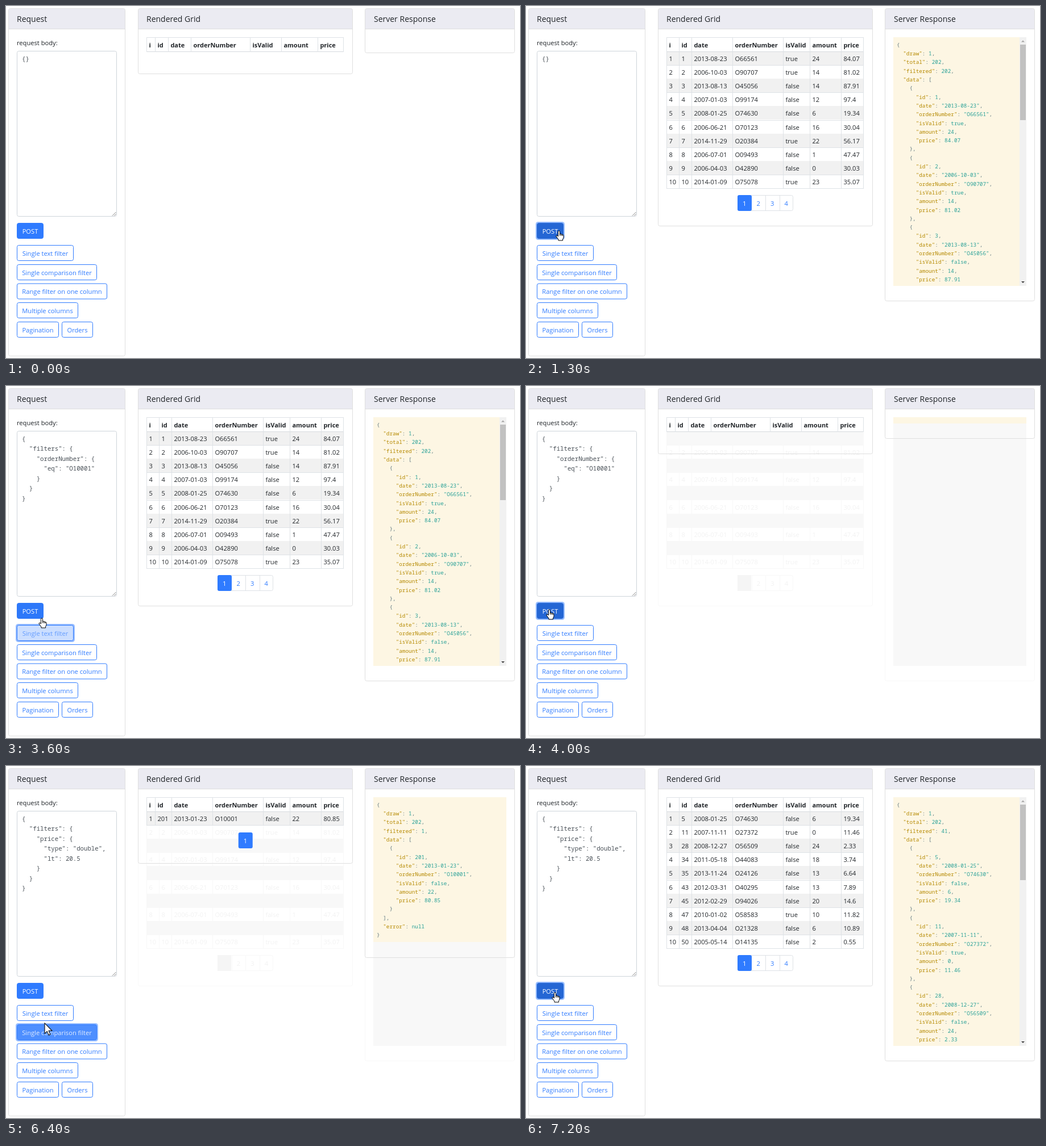
An HTML page that plays this animation: 904 by 620 pixels, repeating every 8 s.

```html
<!DOCTYPE html>
<html lang="en">
<head>
<meta charset="utf-8">
<title>Grid filter demo</title>
<style>
html, body { margin: 0; width: 100%; height: 100%; overflow: hidden; background: #fff; }
svg { display: block; }
text { font: 11.15px "Open Sans", "Noto Sans", sans-serif; fill: #212529; white-space: pre; }
.title { font-size: 14px; }
.head { font-size: 11px; font-weight: 700; }
.mid { text-anchor: middle; }
.body { font: 10.7px "Noto Sans Mono", "DejaVu Sans Mono", monospace; fill: #495057; }
.code { font: 9.35px "Noto Sans Mono", "DejaVu Sans Mono", monospace; fill: #657b83; }
.key { fill: #b58900; }
.val { fill: #2aa198; }
</style>
</head>
<body>
<svg id="stage" width="904" height="620" viewBox="0 0 904 620"></svg>
<script>
const BLUE = '#2f7bff', DARK = '#2466d4', WHITE = '#ffffff';
const LINE = '#dee2e6', EDGE = '#dfdfdf', CREAM = '#fdf6e3';
const FAINT = '#f8f8f8', FAINT_TEXT = '#f2f2f2';
const LOOP = 8000, STEP = 100;
const stage = document.getElementById('stage');

function add(parent, tag, attrs = {}, content) {
  const node = document.createElementNS('http://www.w3.org/2000/svg', tag);
  for (const name in attrs) node.setAttribute(name, attrs[name]);
  if (content !== undefined) node.textContent = content;
  parent.appendChild(node);
  return node;
}
const group = (parent = stage) => add(parent, 'g');
const fill = (g, x, y, width, height, color, rx = 0) =>
  add(g, 'rect', { x, y, width, height, rx, fill: color });
const frame = (g, x, y, w, h, stroke, color = 'none', rx = 3) =>
  add(g, 'rect', { x: x + .5, y: y + .5, width: w - 1, height: h - 1, rx, stroke, fill: color });
function label(g, x, y, content, cls = '', color) {
  const node = add(g, 'text', { x, y, class: cls }, content);
  if (color) node.style.fill = color;
  return node;
}
const show = (node, on) => node.setAttribute('display', on ? 'inline' : 'none');

// Data
const FIELDS = ['id', 'date', 'orderNumber', 'isValid', 'amount', 'price'];
const parse = list => list.trim().split('\n').map(row => row.trim().split(' '));
const allRows = parse(`
  1 2013-08-23 O66561 true 24 84.07
  2 2006-10-03 O90707 true 14 81.02
  3 2013-08-13 O45056 false 14 87.91
  4 2007-01-03 O99174 false 12 97.4
  5 2008-01-25 O74630 false 6 19.34
  6 2006-06-21 O70123 false 16 30.04
  7 2014-11-29 O20384 true 22 56.17
  8 2006-07-01 O09493 false 1 47.47
  9 2006-04-03 O42890 false 0 30.03
  10 2014-01-09 O75078 true 23 35.07`);
const oneRow = parse('201 2013-01-23 O10001 false 22 80.85');
const cheapRows = parse(`
  5 2008-01-25 O74630 false 6 19.34
  11 2007-11-11 O27372 true 0 11.46
  28 2008-12-27 O56509 false 24 2.33
  34 2011-05-18 O44083 false 18 3.74
  35 2013-11-24 O24126 false 13 6.64
  43 2012-03-31 O40295 false 13 7.89
  45 2012-02-29 O94026 false 20 14.6
  47 2010-01-02 O58583 true 10 11.82
  48 2013-04-04 O21328 false 6 10.89
  50 2005-05-14 O14135 false 2 0.55`);

function toRecord(row) {
  const record = {};
  FIELDS.forEach((f, i) => {
    record[f] = i === 1 || i === 2 ? row[i] : JSON.parse(row[i]);
  });
  return record;
}

// Rendered grid
const ROW = 24.1;
const EMPTY_COLS = [247, 262, 285, 325, 429, 484, 548, 593];
const WIDE_COLS = [247, 269, 291, 363, 452, 499, 554, 593];
const ONE_COLS = [247, 262, ...WIDE_COLS.slice(2)];

function drawGrid(g, cols, rows) {
  const bottom = Math.round(80 + rows.length * ROW);
  rows.forEach((row, i) => {
    const y = Math.round(80 + i * ROW);
    if (i % 2 === 0) fill(g, 247, y, 347, 24, '#f1f1f1');
    [i + 1, ...row].forEach((cell, c) => label(g, cols[c] + 4.4, y + 17, cell));
    fill(g, 247, Math.round(80 + (i + 1) * ROW), 347, 1, LINE);
  });
  ['i', ...FIELDS].forEach((name, c) => label(g, cols[c] + 4.4, 73, name, 'head'));
  fill(g, 247, 55, 347, 1, LINE);
  fill(g, 247, 80, 347, 1, '#d6dade');
  cols.forEach(x => fill(g, x, 55, 1, bottom - 54, LINE));
}

function drawPages(g, y, count) {
  const w = 24.5, x0 = 421 - count * w / 2;
  if (count > 1) frame(g, Math.round(x0), y, count * w, 28, LINE, WHITE);
  for (let i = 0; i < count; i++) {
    const x = x0 + i * w;
    if (i === 0) fill(g, x, y, w + .5, 28, BLUE, 3);
    else if (i > 1) fill(g, Math.round(x), y, 1, 28, LINE);
    label(g, x + w / 2, y + 18.5, i + 1, 'mid', i ? BLUE : WHITE);
  }
}

// Server response
function drawCode(g, rows, filtered) {
  const reply = { draw: 1, total: 202, filtered, data: rows.map(toRecord), error: null };
  const lines = JSON.stringify(reply, null, 2).split('\n');
  const long = lines.length > 28;
  fill(g, 646, 55, 234, long ? 438 : 255, CREAM);
  lines.slice(0, 28).forEach((line, i) => {
    const node = label(g, 652, 71.8 + i * 15.3, '', 'code');
    for (const part of line.match(/"\w+"(?=:)|"[^"]*"|[\w.]+|[^"\w]+/g)) {
      const cls = /^"\w+"$/.test(part) && line.includes(part + ':') ? 'key'
        : /^["\w]/.test(part) ? 'val' : '';
      add(node, 'tspan', { class: cls }, part);
    }
  });
  if (!long) return;
  fill(g, 868, 55, 12, 438, '#f1f1f1');
  fill(g, 869, 68, 10, 133, '#c1c1c1');
  add(g, 'path', { d: 'M871 63.5h6l-3-3z', fill: '#a3a3a3' });
  add(g, 'path', { d: 'M871 485h6l-3 3z', fill: '#404040' });
}

function outlines(g, gridBottom, replyBottom, color = EDGE) {
  frame(g, 232, 4, 378, gridBottom - 3, color);
  frame(g, 631, 4, 264, replyBottom - 3, color);
}

// Pale remains of the first full result
function drawGhost(g) {
  outlines(g, 387, 519, FAINT);
  fill(g, 646, 55, 234, 438, FAINT);
  allRows.forEach((row, i) => {
    const y = Math.round(80 + i * ROW);
    if (i % 2 === 0) return fill(g, 247, y, 347, 25, FAINT);
    [i + 1, ...row].forEach((cell, c) => label(g, WIDE_COLS[c] + 4.4, y + 17, cell, '', FAINT_TEXT));
    WIDE_COLS.forEach(x => fill(g, x, y, 1, 24, FAINT));
  });
  fill(g, 247, 321, 347, 1, FAINT);
  frame(g, 372, 333, 98, 28, FAINT);
  fill(g, 372, 333, 24, 28, '#f5f5f5');
  [2, 3, 4].forEach(n => {
    fill(g, Math.round(347.5 + n * 24.5), 333, 1, 28, FAINT);
    label(g, 335.5 + n * 24.5 + 24.5, 351.5, n, 'mid', FAINT_TEXT);
  });
}

const ghost = group();
drawGhost(ghost);

// Fixed parts
const base = group();
[[4, 206, 'Request', 19], [232, 378, 'Rendered Grid', 247], [631, 264, 'Server Response', 647]]
  .forEach(([x, w, title, tx]) => {
    add(base, 'path', {
      d: `M${x + .5} 40V8q0-3.5 3.5-3.5h${w - 8}q3.5 0 3.5 3.5V40z`, fill: '#ebebf2'
    });
    fill(base, x, 40, w, 1, EDGE);
    label(base, tx, 28, title, 'title');
  });
frame(base, 4, 4, 206, 613, EDGE);
label(base, 19, 69, 'request body:');
frame(base, 19, 79, 176, 292, '#ced4da', WHITE);
add(base, 'path', { d: 'M187 369.5l6.5-6.5M190.5 369.5l3-3', stroke: '#777', 'stroke-width': .9 });

// Result states
const scenes = {
  idle(g) {
    outlines(g, 119, 82);
    drawGrid(g, EMPTY_COLS, []);
  },
  clear(g) {
    outlines(g, 119, 92);
    drawGrid(g, EMPTY_COLS, []);
    fill(g, 646, 55, 234, 11, CREAM);
  },
  all(g) {
    outlines(g, 387, 519);
    drawGrid(g, WIDE_COLS, allRows);
    drawPages(g, 333, 4);
    drawCode(g, allRows, 202);
  },
  one(g) {
    outlines(g, 171, 337);
    fill(g, 247, 56, 347, 49, WHITE);
    drawGrid(g, ONE_COLS, oneRow);
    drawPages(g, 117, 1);
    drawCode(g, oneRow, 1);
  },
  cheap(g) {
    outlines(g, 387, 519);
    drawGrid(g, WIDE_COLS, cheapRows);
    drawPages(g, 333, 4);
    drawCode(g, cheapRows, 41);
  }
};
const sceneNodes = {};
for (const name in scenes) scenes[name](sceneNodes[name] = group());

// Request bodies
const bodies = [
  {},
  { filters: { orderNumber: { eq: 'O10001' } } },
  { filters: { price: { type: 'double', lt: 20.5 } } }
].map(body => {
  const g = group();
  JSON.stringify(body, null, 2).split('\n')
    .forEach((line, i) => label(g, 28, 96.8 + i * 17.5, line, 'body'));
  return g;
});

// Buttons
const buttons = [
  ['POST', 19, 382, 47], ['Single text filter', 19, 421, 100],
  ['Single comparison filter', 19, 455, 141], ['Range filter on one column', 19, 488.5, 159],
  ['Multiple columns', 19, 522, 108], ['Pagination', 19, 556, 74], ['Orders', 98, 556, 55]
].map(([name, x, y, w], i) => {
  const ring = fill(stage, x - 2, y - 2, w + 4, 32, '#97bdff', 4.5);
  const box = frame(stage, x, y, w, 28, BLUE, WHITE);
  const text = label(stage, x + w / 2, y + 18.8, name, 'mid');
  return { x, y, w, ring, box, text, solid: i === 0 };
});

function mix(a, b, p) {
  const part = (hex, i) => parseInt(hex.slice(i, i + 2), 16);
  return `rgb(${[1, 3, 5].map(i => Math.round(part(a, i) + (part(b, i) - part(a, i)) * p))})`;
}

// Pointer
const pointer = group();
const arrow = add(pointer, 'path', {
  d: 'M0 0V16L3.7 12.5 6.2 18.3 8.7 17.2 6.2 11.6H11.3Z',
  transform: 'scale(1.15)', fill: '#fff', stroke: '#000', 'stroke-width': .9
});
const hand = add(pointer, 'path', {
  d: 'M-1.5 10V1.5Q-1.5 0 0 0T1.5 1.5V5.5Q3.5 4.8 3.8 6Q5.6 5.4 6 6.8Q8 6.4 8 8.5V11.5' +
    'Q8 13 6.6 14.5V17H-1V15.2L-4.8 10Q-5.6 8.4 -4 8Q-2.6 8 -1.5 10M1.5 5.5V8.5M3.8 6V8.8M6 6.8V9',
  fill: '#fff', stroke: '#000', 'stroke-linejoin': 'round'
});

// Timelines: [ms, value]
const sceneLine = [[0, 'idle'], [1200, 'clear'], [1300, 'all'], [4000, 'clear'],
  [4200, 'one'], [7100, 'clear'], [7200, 'cheap']];
const bodyLine = [[0, 0], [3300, 1], [6000, 2]];
const focusLine = [[0, -1], [1200, 0], [3300, 1], [3900, 0], [6000, 2], [7100, 0]];
const path = [
  [300, 763, 128], [600, 300, 290], [800, 110, 372], [1000, 58, 395.5],
  [2200, 58, 395.5], [2700, 88, 418], [2800, 94, 426.5], [3000, 96, 431],
  [3300, 96, 431], [3800, 41, 393.5], [5000, 41, 393.5], [5100, 43, 398],
  [5400, 58, 440], [5500, 63, 454.9], [5700, 71, 464], [6300, 71, 464], [6900, 51, 399]
];

const valueAt = (line, t) => line.filter(([start]) => start <= t).pop()[1];

function pointAt(t) {
  if (t < path[0][0]) return null;
  const next = path.findIndex(p => p[0] > t);
  if (next < 0) return path[path.length - 1].slice(1);
  const [t0, x0, y0] = path[next - 1], [t1, x1, y1] = path[next];
  const p = (t - t0) / (t1 - t0);
  return [x0 + (x1 - x0) * p, y0 + (y1 - y0) * p];
}

function isOver(b, t) {
  const p = pointAt(t);
  return p && p[0] > b.x && p[0] < b.x + b.w && p[1] > b.y && p[1] < b.y + 28 ? 1 : 0;
}

function render(now) {
  const t = Math.floor((now % LOOP) / STEP) * STEP;
  const scene = valueAt(sceneLine, t), body = valueAt(bodyLine, t), focus = valueAt(focusLine, t);
  for (const name in sceneNodes) show(sceneNodes[name], name === scene);
  show(ghost, t >= 4000 && t < 7200);
  bodies.forEach((g, i) => show(g, i === body));

  buttons.forEach((b, i) => {
    // Hover colour trails the pointer like a short transition
    const level = .15 * isOver(b, t) + .6 * isOver(b, t - STEP) + .25 * isOver(b, t - 2 * STEP);
    const color = b.solid ? mix(BLUE, DARK, level) : mix(WHITE, BLUE, level);
    b.box.setAttribute('fill', color);
    b.box.setAttribute('stroke', b.solid ? color : BLUE);
    b.text.style.fill = b.solid ? WHITE : mix(BLUE, WHITE, level);
    show(b.ring, i === focus);
  });

  const point = pointAt(t);
  show(pointer, point);
  if (point) {
    const over = buttons.some(b => isOver(b, t));
    show(hand, over);
    show(arrow, !over);
    pointer.setAttribute('transform', `translate(${point.map(Math.round)})`);
  }
}

const start = performance.now();
function tick() {
  render(performance.now() - start);
  requestAnimationFrame(tick);
}
tick();
</script>
</body>
</html>
```
